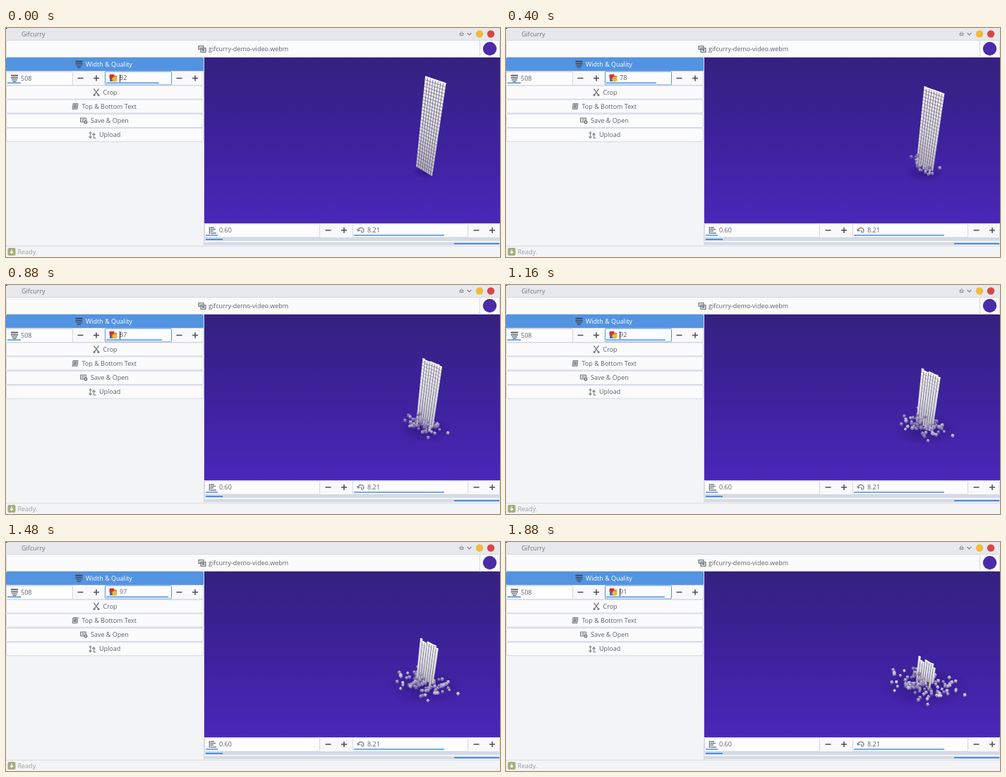
These frames come from a looping animation (700 px wide and 326 px high, 1920 ms). An HTML page with a canvas:

```html
<!DOCTYPE html>
<html lang="en">
<head>
<meta charset="utf-8">
<title>Gifcurry</title>
<style>
html, body { margin: 0; width: 100%; height: 100%; overflow: hidden; background: #f3f4f5; }
svg, canvas { position: absolute; left: 0; top: 0; }
canvas { left: 281px; top: 42px; }
text { font: 9px "Open Sans", "Noto Sans", sans-serif; fill: #5c616c; }
</style>
</head>
<body>
<svg id="ui" width="700" height="326"></svg>
<canvas id="video" width="419" height="236"></canvas>
<script>
const rect = (x, y, w, h, fill, extra = '') =>
  `<rect x="${x}" y="${y}" width="${w}" height="${h}" fill="${fill}" ${extra}/>`;
const box = (x, y, w, h, fill = '#fbfbfc', line = '#d3d8e3') =>
  rect(x + .5, y + .5, w - 1, h - 1, fill, `stroke="${line}" rx="1.5"`);
const text = (x, y, s, extra = '') => `<text x="${x}" y="${y}" ${extra}>${s}</text>`;
const path = (d, line = '#777a80', width = 1.2, fill = 'none') =>
  `<path d="${d}" stroke="${line}" stroke-width="${width}" fill="${fill}"/>`;
const dot = (x, y, r, fill) => `<circle cx="${x}" cy="${y}" r="${r}" fill="${fill}"/>`;
const at = (x, y, s) => `<g transform="translate(${x} ${y})">${s}</g>`;

// Icons are drawn around their own centre.
const bars = color => rect(-5, -5, 10, 2.5, color) + rect(-5, -1.5, 10, 2, color) +
  rect(-4, 1.5, 8, 1.5, color) + rect(-2.5, 4, 5, 1.5, color);
const icons = {
  film: path('M-5 -4H2V1H-5ZM-2 -1H5V5H-2Z', '#777a80', 1.2, '#d4d5d8') + path('M0 2H3M1.5 .5V3.5'),
  crop: path('M-3.5 -5L3 4M3.5 -5L-3 4', '#85888d', 1.5) + dot(-3, 4, 1.5, '#777a80') + dot(3, 4, 1.5, '#777a80'),
  text: path('M-3 -4H4L3 4H-4Z', '#85888d', 1, '#b5b7bb') + path('M-1.5 -1.5H2M-2 1H1.5', '#55585e', 1),
  save: path('M-5 -4H3V2H-5Z', '#777a80', 1, '#dedfe2') + path('M-3 -2H1M-3 0H0', '#8d9096', 1) +
    dot(2.5, 2, 2.5, '#777a80') + dot(2.5, 2, 1, '#eee'),
  upload: path('M-3 -5V4M-5 2L-3 4.5L-1 2M2 4V-2M0 0L2 -2.5L4 0', '#85888d') + path('M-5 -3H-1M1 4.5H5', '#777a80', 1),
  start: path('M-4.5 -5V5M-3 -4H2M-3 -1.5H4M-3 1H1M-3 4H5', '#777a80', 1.6),
  end: path('M-4 1A4 4 0 1 1 3 3M-4 1L-5.5 -1.5M-4 1L-1.5 0M0 0L2 4', '#888b91', 1.5),
  colors: rect(-5.5, -5, 7, 6, '#d8322f', 'rx="1"') + rect(-5, 1, 6, 4, '#3d6fc4') +
    rect(1, -3, 4, 5, '#e4762f') + dot(2, 2, 3.6, '#e9b83c')
};

const minusPlus = (x, y) => path(`M${x - 4} ${y}h8M${x + 18.5} ${y}h8m-4 -4v8`, '#4a4e57', 1.5);
const entry = (x, y, w, icon, value, line) =>
  box(x, y, w, 20, '#fdfdfd', line) + at(x + 12, y + 9.5, icon) + text(x + 21, y + 12.5, value);
const button = (y, label, x, icon) =>
  box(0, y, 280, 20) + at(x - 9.5, y + 10, icon) + text(x, y + 13, label);
const blue = '#4a90e0';

document.getElementById('ui').innerHTML =
  rect(0, 0, 700, 17, '#e7e8eb') + rect(0, 0, 1.5, 1, '#222') + text(22, 12, 'Gifcurry', 'fill-opacity=".85"') +
  path('M642.5 8.5L645.5 5.5L648.5 8.5ZM642.5 10.5H648.5', '#85888f', 1) +
  path('M653.5 7L656.5 10L659.5 7', '#85888f', 1.2) +
  dot(671, 8.5, 5.2, '#efbb3c') + dot(687, 8.5, 5.2, '#dc4545') +
  box(0, 17, 672, 25) + box(671, 17, 29, 25) + dot(685.5, 29.5, 9.7, '#4a2ba8') +
  at(278, 29.5, icons.film) + text(287, 32.5, 'gifcurry-demo-video.webm') +
  rect(0, 42, 280, 19.5, '#5294e2', 'rx="1.5"') + at(103.5, 51.5, bars('#42546d')) +
  text(113, 54.7, 'Width &amp; Quality', 'style="fill:#fff"') +
  box(0, 61, 280, 21, '#f9f9fa') +
  entry(0, 62, 95, bars('#777a80'), '508') + rect(2, 77.5, 19, 1.5, blue) + minusPlus(105.5, 71.5) +
  entry(140, 61.5, 95, icons.colors, '<tspan id="count"></tspan>', '#5294e2') +
  rect(142, 77.5, 0, 1.5, blue, 'id="level"') + rect(161, 66, 1, 11, '#333', 'id="caret"') + minusPlus(245.5, 71.5) +
  button(81.5, 'Crop', 137.5, icons.crop) +
  button(101.5, 'Top &amp; Bottom Text', 107.5, icons.text) +
  button(122, 'Save &amp; Open', 120, icons.save) +
  button(142.3, 'Upload', 132, icons.upload) +
  rect(280, 42, 1, 269, '#d9dce4') + box(281, 278, 419, 21, '#f9f9fa') +
  entry(281, 278.5, 164, icons.start, '0.60') + rect(283, 294.3, 17, 1.5, blue) + minusPlus(456.5, 288) +
  entry(491, 278.5, 164, icons.end, '8.21') + rect(493, 294.3, 128, 1.5, blue) + minusPlus(666.5, 288) +
  rect(281, 299, 419, 4, '#d5dae5') + rect(283, 300, 24, 2, blue) +
  rect(281, 305, 419, 4, '#d5dae5') + rect(635, 306, 64, 2, blue) +
  rect(0, 310, 700, 1, '#d9dce2') +
  rect(2.5, 313, 11, 11, '#a5ad7c', 'rx="2"') + path('M8 315.5V320M6 318.5L8 320.8L10 318.5', '#fff', 1.3) +
  text(16.5, 322, 'Ready.', 'style="fill:#9b9fa6"');

const [count, level, caret, video] = ['count', 'level', 'caret', 'video'].map(id => document.getElementById(id));
const g = video.getContext('2d');
g.translate(-281, -42);

const clamp = x => Math.max(0, Math.min(1, x));
const rnd = n => { const s = Math.sin(n * 12.9898 + 4.1) * 43758.5453; return s - Math.floor(s); };
const within = (x, a, b) => x >= a && x < b;

function track(points, t) {
  const i = Math.max(1, points.findIndex(p => p[0] >= t));
  const [a, b] = [points[i - 1], points[i]];
  return a[1] + (b[1] - a[1]) * (t - a[0]) / (b[0] - a[0]);
}
const quality = [[0, 82], [224, 78], [380, 78], [1440, 97], [1545, 97], [1920, 90.3]];

// Wall coordinates: u runs left to right, v from the first top edge to the floor.
function wall(u, v) {
  const left = [594 - 13 * v, 69 + 128 * v], right = [623.5 - 19.5 * v, 79 + 132 * v];
  return [left[0] + (right[0] - left[0]) * u, left[1] + (right[1] - left[1]) * u];
}
function poly(points, fill) {
  g.beginPath();
  points.forEach(p => g.lineTo(...p));
  if (fill) { g.closePath(); g.fillStyle = fill; g.fill(); } else g.stroke();
}

const COLS = 8, ROWS = 27, CUBES = 135;
const floorY = x => 196 + (x - 581) * .65;

const cubes = Array.from({ length: CUBES }, (_, i) => ({
  born: .05 + 1.85 * (i / CUBES) ** 1.2,
  u: rnd(i), angle: rnd(i + 200) * 2 * Math.PI, speed: 5 + 23 * rnd(i + 400) ** .8,
  lift: 22 * rnd(i + 600), spin: rnd(i + 800) * 3, size: 3.4 + 1.3 * rnd(i + 1000), tone: rnd(i + 1200)
}));

function place(c, t) {
  const age = t - c.born, run = 4 + c.speed * age;
  const [bx, by] = wall(c.u, 1);
  const x = bx + Math.cos(c.angle) * run;
  const y = by - 2 + Math.sin(c.angle) * run * .52;
  return { ...c, x, y, z: c.lift * clamp(1 - age * 1.1), out: clamp(run / 40), turn: c.spin + age };
}

function drawCube(c) {
  const s = c.size, light = 48 + 16 * c.out + 20 * c.tone;
  g.save();
  g.translate(c.x, c.y - c.z);
  g.rotate(c.turn);
  g.globalAlpha = .72 + .28 * c.out;
  g.fillStyle = `hsl(253 22% ${light - 8}%)`;
  g.fillRect(-s / 2, -s / 2, s, s);
  g.rotate(-c.turn);
  g.fillStyle = `hsl(253 22% ${light + 10}%)`;
  g.fillRect(-s * .38, -s * .5, s * .7, s * .5);
  g.restore();
}

function drawWall(t) {
  const fall = (32.6 * t + 9.57 * t * t) / 128;
  for (let c = 0; c < COLS; c++) {
    const a = c / COLS, b = (c + 1) / COLS;
    const v0 = fall + (rnd(c + 50) - .4) * .012 * t * t;
    const v1 = 1 - rnd(c + 70) * .07 * clamp(t * 2);
    const shade = g.createLinearGradient(0, wall(a, v0)[1], 0, wall(a, v1)[1]);
    shade.addColorStop(0, '#f3f2f5');
    shade.addColorStop(.6, '#dedde3');
    shade.addColorStop(1, '#bcb8c8');
    poly([wall(a, v0), wall(b, v0), wall(b, v1), wall(a, v1)], shade);
    g.lineWidth = .7;
    for (let r = 1; r < ROWS; r++) {
      const v = v0 + r / ROWS;
      if (v > v1) break;
      g.strokeStyle = `rgba(65,60,80,${.75 * clamp(1.15 - (v - v0) * t * 2 - t * t * .35)})`;
      poly([wall(a, v), wall(b, v)]);
    }
    if (c) {
      g.strokeStyle = 'rgba(65,60,80,.7)';
      poly([wall(a, v0 + .01), wall(a, v1)]);
    }
    g.strokeStyle = '#fff';
    g.lineWidth = 1.6;
    poly([wall(a, v0), wall(b, v0)]);
  }
}

function drawVideo(t) {
  const sky = g.createLinearGradient(0, 42, 0, 278);
  sky.addColorStop(0, '#34217f');
  sky.addColorStop(.5, '#3d229c');
  sky.addColorStop(1, '#4b27b9');
  g.fillStyle = sky;
  g.fillRect(281, 42, 419, 236);

  g.save();
  g.translate(594, 206);
  g.scale(1, .5);
  const reach = 18 + 24 * t, shadow = g.createRadialGradient(0, 0, 0, 0, 0, reach);
  shadow.addColorStop(0, 'rgba(30,12,90,.45)');
  shadow.addColorStop(1, 'rgba(30,12,90,0)');
  g.fillStyle = shadow;
  g.fillRect(-reach, -reach, 2 * reach, 2 * reach);
  g.restore();

  const loose = cubes.filter(c => c.born <= t).map(c => place(c, t)).sort((a, b) => a.y - b.y);
  loose.filter(c => c.y < floorY(c.x)).forEach(drawCube);
  drawWall(t);
  loose.filter(c => c.y >= floorY(c.x)).forEach(drawCube);
}

function frame(now) {
  const ms = Math.floor(now % 1920 / 40) * 40;
  const value = Math.round(track(quality, ms));
  count.textContent = value;
  level.setAttribute('width', value * .91);
  caret.setAttribute('opacity', within(ms, 300, 420) || within(ms, 1460, 1560) ? 0 : 1);
  drawVideo(ms / 1000);
  requestAnimationFrame(frame);
}
frame(0);
</script>
</body>
</html>
```
